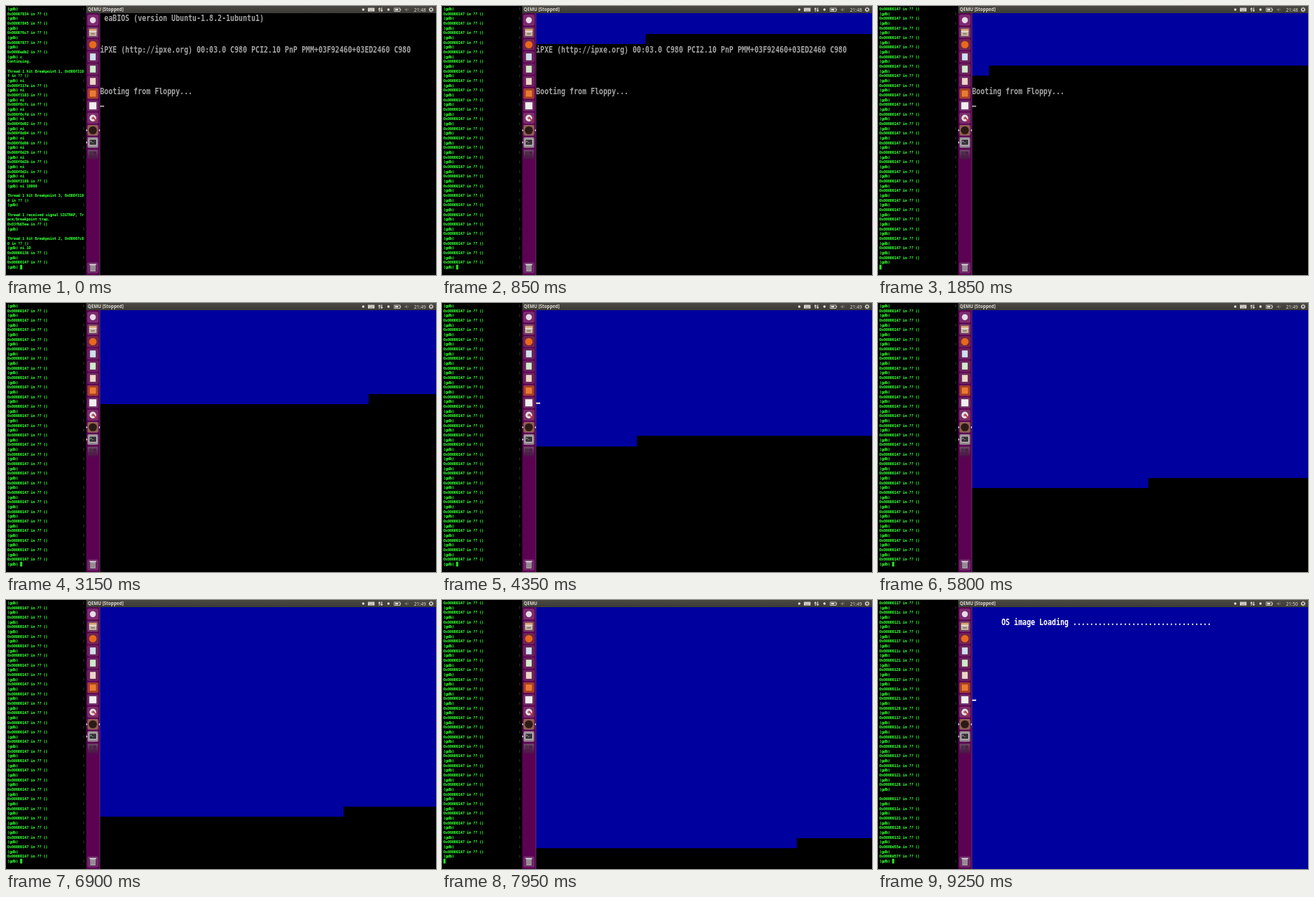
Recreate the animation shown at these times as an HTML page with a canvas. Size 600x375 px, loop 9.3 s.

```html
<!DOCTYPE html>
<html lang="en">
<head>
<meta charset="utf-8">
<title>Boot sector stepping</title>
<style>
html, body { margin: 0; width: 100%; height: 100%; overflow: hidden; background: #000; }
canvas { display: block; width: 600px; height: 375px; }
</style>
</head>
<body>
<canvas id="stage" width="600" height="375"></canvas>
<script>
const ctx = document.getElementById('stage').getContext('2d');
const LOOP = 9300, STEP = 50;
const MONO = '"DejaVu Sans Mono", monospace';
const SANS = '"Noto Sans", sans-serif';

// Text-mode screen of the virtual machine: 80 x 25 cells
const LEFT = 131.2, TOP = 9.4, CELL_W = 5.86, CELL_H = 14.65, CELLS = 2000;
const BLUE = '#00009e';
const BOOT = [
  [0, ' eaBIOS (version Ubuntu-1.8.2-1ubuntu1)'],
  [3, 'iPXE (http://ipxe.org) 00:03.0 C980 PCI2.10 PnP PMM+03F92460+03ED2460 C980'],
  [7, 'Booting from Floppy...']
];
const MESSAGE = 'OS image Loading ' + '.'.repeat(33);

// Number of cells painted blue over time
const FILL = [[0, 0], [1850, 404], [3150, 704], [4350, 984], [5800, 1322], [7950, 1822], [8715, CELLS]];
const PRINT_START = 8715, PRINT_END = 9200;

// Debugger log
const ROWS = 55, ROW_H = 6.667, COL_W = 2.96, PROMPT = '(gdb)';
const at = a => '0x' + a.padStart(8, '0') + ' in ?? ()';
const pairs = list => list.flatMap(a => [at(a), PROMPT]);
const steps = list => list.flatMap(a => [PROMPT + ' ni', at(a)]);
const log = [
  PROMPT, at('7834'), PROMPT, at('7845'), PROMPT, at('76c7'), PROMPT, at('7877'), PROMPT, at('adb2'),
  PROMPT + ' c', 'Continuing.', '',
  'Thread 1 hit Breakpoint 1, 0x000f310', 'f in ?? ()',
  ...steps(['f317e', 'f3183', 'f0cfc', 'f0cfd', 'f0d02', 'f0d04', 'f0d06', 'f0d29', 'f0d2b', 'f0d2c', 'f3188']),
  PROMPT + ' ni 10000', '',
  'Thread 1 hit Breakpoint 3, 0x000f319', '4 in ?? ()', PROMPT, '',
  'Thread 1 received signal SIGTRAP, Tr', 'ace/breakpoint trap.', at('3fb65ea'), PROMPT, '',
  'Thread 1 hit Breakpoint 2, 0x00007c0', '0 in ?? ()',
  PROMPT + ' ni 10', at('136'), PROMPT, at('147'), PROMPT
];
const first = log.length;
for (let i = 0; i < CELLS; i++) log.push(at('147'), PROMPT);
const printBase = log.length;
const cycle = ['117', '11c', '121', '128'];
for (let i = 0; i < 49; i++) log.push(...pairs(cycle));
log.push('', ...pairs([...cycle, '132', 'd55e', 'd57f']));

const clamp = (v, lo, hi) => Math.min(hi, Math.max(lo, v));
const printed = t => clamp((t - PRINT_START) / (PRINT_END - PRINT_START), 0, 1);

function filled(t) {
  for (let i = 1; i < FILL.length; i++) {
    const [t0, n0] = FILL[i - 1], [t1, n1] = FILL[i];
    if (t <= t1) return Math.round(n0 + (n1 - n0) * (t - t0) / (t1 - t0));
  }
  return CELLS;
}

function rect(x, y, w, h, color) {
  ctx.fillStyle = color;
  ctx.fillRect(x, y, w, h);
}

function disc(x, y, r, color) {
  ctx.fillStyle = color;
  ctx.beginPath();
  ctx.arc(x, y, r, 0, 7);
  ctx.fill();
}

function poly(color, ...p) {
  ctx.fillStyle = color;
  ctx.beginPath();
  for (let i = 0; i < p.length; i += 2) ctx.lineTo(p[i], p[i + 1]);
  ctx.fill();
}

function text(s, x, y, font, color) {
  ctx.font = font;
  ctx.fillStyle = color;
  ctx.fillText(s, x, y);
}

// One glyph per grid column
function gridText(s, x, y, pitch) {
  for (let i = 0; i < s.length; i++) {
    if (s[i] !== ' ') ctx.fillText(s[i], x + i * pitch, y);
  }
}

function terminal(t, n, waiting) {
  rect(0, 0, 112, 375, '#000');
  let end = first + 2 * n;
  if (t >= PRINT_START) {
    const k = printed(t);
    end = k === 1 ? log.length : printBase + 2 * Math.floor(k * (log.length - printBase) / 2);
  }
  const start = end - ROWS + (waiting ? 1 : 0);
  ctx.font = 'bold 5.6px ' + MONO;
  for (let r = 0; r < ROWS; r++) {
    const line = start + r < end ? log[start + r] : '';
    const y = 4 + r * ROW_H;
    ctx.fillStyle = '#33ff33';
    gridText(line, 1.8, y + 2, COL_W);
    if (line.startsWith(PROMPT)) rect(108, y - 2, 1, 4, '#2c2c2c');
  }
  const last = 4 + (ROWS - 1) * ROW_H;
  rect(waiting ? 2 : 19.7, last - 3.3, 2.9, 6.6, '#22ee22');
}

function dosLine(row, col, s, color) {
  ctx.save();
  ctx.translate(LEFT + col * CELL_W, TOP + row * CELL_H + 11.3);
  ctx.scale(1, 1.3);
  ctx.font = 'bold 9.73px ' + MONO;
  ctx.fillStyle = color;
  gridText(s, 0, 0, CELL_W);
  ctx.restore();
}

function machine(t, n, blink) {
  rect(131, 10, 469, 365, '#000');
  for (const [row, s] of BOOT) dosLine(row, 0, s, '#a4a4a4');
  const full = Math.floor(n / 80), rest = n % 80;
  const y = Math.round(TOP + full * CELL_H);
  const bottom = Math.round(TOP + (full + 1) * CELL_H);
  if (full) rect(131, TOP, 469, y - TOP, BLUE);
  if (rest) rect(131, y, Math.round(LEFT + rest * CELL_W) - 131, bottom - y, BLUE);
  if (t >= PRINT_START) {
    dosLine(1, 7, MESSAGE.slice(0, Math.floor(printed(t) * MESSAGE.length)), '#fff');
  }
  if (blink) rect(131, TOP + 8 * CELL_H + 12.2, 6, 1.8, n > 640 ? '#fff' : '#a8a8a8');
}

function tile(y, color) {
  ctx.fillStyle = color;
  ctx.strokeStyle = 'rgba(255,255,255,.18)';
  ctx.lineWidth = 0.6;
  ctx.beginPath();
  ctx.roundRect(113.9, y - 7.2, 14.6, 14.4, 1.6);
  ctx.fill();
  ctx.stroke();
}

function launcher() {
  rect(112, 10, 19, 365, '#5b0352');
  rect(130.6, 10, 0.8, 365, '#6a4068');
  const y = i => 19.8 + i * 17.05;

  tile(y(0), '#7b2a70');
  disc(121.2, y(0), 4.2, '#e6dbe4');

  tile(y(1), '#6c3a60');
  rect(116, y(1) - 5, 10.4, 10, '#c9b9a4');
  rect(116, y(1) - 5, 10.4, 2.6, '#d9a070');
  rect(116, y(1) - 2, 10.4, 1, '#f5efe6');
  rect(118.5, y(1) + 1.2, 5.4, 1.4, '#776a60');

  tile(y(2), '#6d2449');
  disc(121.2, y(2), 5.2, '#e8691c');

  ['#cfdfec', '#cfeacb', '#ecd6c8'].forEach((c, i) => {
    tile(y(3 + i), '#682058');
    rect(117.2, y(3 + i) - 4.8, 8, 9.6, c);
  });

  tile(y(6), '#a33c22');
  rect(116.8, y(6) - 4.4, 8.8, 8.8, '#e97a35');

  tile(y(7), '#6b2a60');
  rect(116.2, y(7) - 5, 10, 10, '#f0eeee');

  tile(y(8), '#7a2b65');
  disc(121.2, y(8), 4.7, '#e3dfe1');
  disc(121.2, y(8), 1.7, '#8b6d83');
  poly('#cf3038', 121, y(8) - 1, 122.3, y(8) - 2, 126.6, y(8) + 4, 125, y(8) + 5);

  tile(y(9), '#8e5f4f');
  disc(121.2, y(9), 5.6, '#2b1a16');

  tile(y(10), '#8f858d');
  rect(115.6, y(10) - 5, 11.2, 9.4, '#d5d1d2');
  rect(116.5, y(10) - 4.1, 9.4, 7.4, '#343236');
  text('>_', 117.3, y(10), 'bold 4px ' + MONO, '#eee');

  const fade = ctx.createLinearGradient(0, y(11) - 7, 0, y(11) + 7);
  fade.addColorStop(0, '#6f4a6a');
  fade.addColorStop(1, '#4f0a48');
  rect(114, y(11) - 7, 14.4, 14, fade);
  rect(116, y(11) - 4.5, 4.6, 4, '#463043');
  for (let i = 1; i < 4; i++) {
    rect(116 + (i % 2) * 5.4, y(11) - 4.5 + (i >> 1) * 4.8, 4.6, 4, '#4a2045');
  }

  tile(365, '#6b2763');
  rect(117.5, 361, 7.4, 9, '#aaa2a9');
  rect(116.5, 359.6, 9.4, 1.5, '#ded7dc');
  for (let i = 0; i < 3; i++) rect(118.8 + i * 2, 362.3, 0.7, 6.5, '#6c6069');

  for (const i of [9, 10]) poly('#eee', 112, y(i) - 1.7, 113.7, y(i), 112, y(i) + 1.7);
  poly('#eee', 131, y(9) - 1.7, 129.3, y(9), 131, y(9) + 1.7);
}

function panel(t, running) {
  const g = ctx.createLinearGradient(0, 0, 0, 10);
  g.addColorStop(0, '#4a4842');
  g.addColorStop(1, '#3c3b37');
  rect(112, 0, 488, 10, g);
  const ink = '#dfdbd2';
  text(running ? 'QEMU' : 'QEMU [Stopped]', 114, 7.4, 'bold 6.2px ' + SANS, ink);

  disc(498.5, 5, 1.7, ink);
  rect(505, 2.6, 9.2, 5, ink);
  for (let i = 0; i < 4; i++) rect(506 + i * 2, 3.7, 1, 0.9, '#8a867e');
  rect(507, 5.8, 5.2, 0.8, '#8a867e');
  poly(ink, 519.1, 4.4, 521, 1.9, 522.9, 4.4);
  rect(520.4, 4, 1.2, 3.8, ink);
  poly(ink, 522.3, 5.7, 524.2, 8.3, 526.1, 5.7);
  rect(523.6, 2.3, 1.2, 3.8, ink);
  disc(533.7, 5, 1.7, ink);
  ctx.strokeStyle = ink;
  ctx.lineWidth = 0.8;
  ctx.strokeRect(541.8, 3, 8, 4.4);
  rect(550.2, 4.2, 0.9, 2, ink);
  rect(543, 4, 4.4, 2.4, ink);
  poly('#77746c', 556.5, 4, 558, 4, 560, 2.4, 560, 7.8, 558, 6.2, 556.5, 6.2);
  rect(561, 3.6, 0.7, 3, '#77746c');

  const minute = t < 2500 ? 48 : t < 8500 ? 49 : 50;
  text('21:' + minute, 569.2, 7.5, '6.6px ' + SANS, ink);

  for (let i = 0; i < 8; i++) {
    const a = i * Math.PI / 4;
    disc(593.2 + 2.7 * Math.cos(a), 5 + 2.7 * Math.sin(a), 0.7, ink);
  }
  ctx.lineWidth = 1.2;
  ctx.beginPath();
  ctx.arc(593.2, 5, 2, 0, 7);
  ctx.stroke();
}

function draw(now) {
  const tick = Math.floor((now % LOOP) / STEP);
  const t = tick * STEP;
  const n = filled(t);
  const beat = tick % 11;
  const printing = t >= PRINT_START;
  machine(t, n, (tick + 2) % 11 < 7);
  launcher();
  panel(t, !printing && beat === 5);
  terminal(t, n, !printing && (beat === 4 || beat === 5));
}

const origin = performance.now();
function loop() {
  draw(performance.now() - origin);
  requestAnimationFrame(loop);
}
loop();
</script>
</body>
</html>
```
